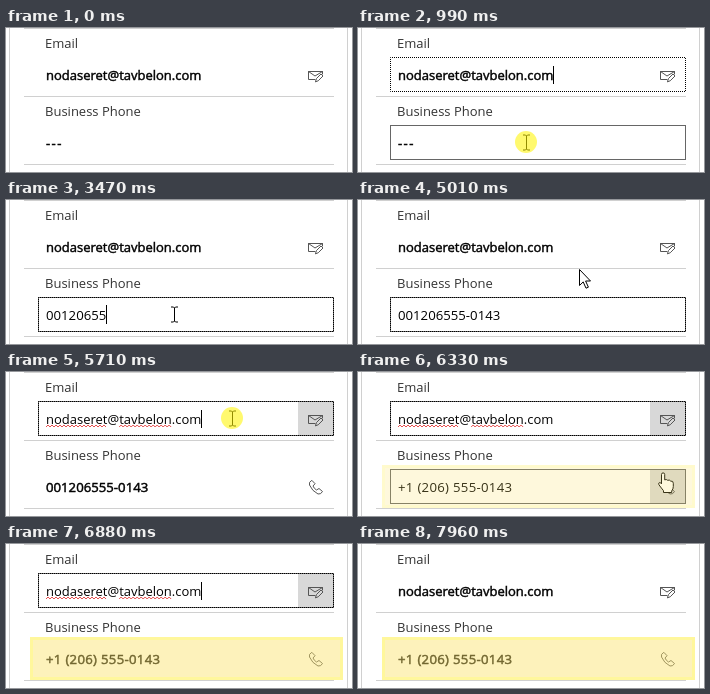
Recreate the animation shown at these times as an HTML page. Size 346 px wide and 144 px high, loop 8510 ms.

```html
<!DOCTYPE html>
<html lang="en">
<head>
<meta charset="utf-8">
<title>Contact form</title>
<style>
html, body { margin: 0; width: 100%; height: 100%; overflow: hidden; background: #fff; }
svg { display: block; }
text { font: 13px "Open Sans", "Noto Sans", sans-serif; fill: #000; }
.label { fill: #333; }
.bold { stroke: #000; stroke-width: .45px; }
.hint { fill: #666; }
.digits { font-size: 13.2px; }
.spaced { letter-spacing: .29px; }
.dashes { letter-spacing: 1.4px; }
.lines { stroke: #d0d0d0; fill: none; }
.box { fill: none; stroke: #666; }
.dots { fill: none; stroke: #000; stroke-dasharray: 1 1; stroke-dashoffset: .5; }
.cell { fill: #d8d8d8; }
.icon { fill: none; stroke: #555; stroke-linejoin: round; stroke-linecap: round; }
.squiggle { fill: none; stroke: #e23b3b; stroke-width: .9; }
.caret { shape-rendering: crispEdges; }
</style>
</head>
<body>
<svg width="346" height="144" viewBox="0 0 346 144">
  <path class="lines" d="M3.5 0V144M341.5 0V144M18 .5H328M18 68.5H328M18 136.5H328"/>
  <text class="label" x="39" y="20">Email</text>
  <text class="label" x="39" y="88">Business Phone</text>

  <g id="email">
    <rect class="cell" x="292" y="30" width="35" height="33"/>
    <rect class="box" x="32.5" y="29.5" width="295" height="34"/>
    <rect class="dots" x="32.5" y="29.5" width="295" height="34"/>
    <text class="value" x="40" y="52">nodaseret@tavbelon.com</text>
    <path class="squiggle"/>
    <rect class="caret" y="38" width="1" height="18"/>
    <path class="icon" d="M309 51.5H302.5V43.5H316.5V46M302.5 43.5L309 48L316.5 43.5M309.5 53.5L310.5 50.5L315 46L317 48L312.5 52.5Z"/>
  </g>

  <g id="phone">
    <rect class="cell" x="292" y="98" width="35" height="33"/>
    <rect class="box" x="32.5" y="97.5" width="295" height="34"/>
    <rect class="dots" x="32.5" y="97.5" width="295" height="34"/>
    <text class="value" x="40" y="120"></text>
    <rect class="caret" y="105" width="1" height="19"/>
    <path class="icon" d="M305.5 108.5Q302.5 110 303.5 113Q306 119 312 122Q315 122.5 316.5 119.5L313 116.5L310.5 118Q308 116.5 307 114L308.8 112Z"/>
  </g>

  <g id="cursor">
    <path id="beam" fill="none" stroke="#000" d="M-3.5-7.5H-1L0-6.5L1-7.5H3.5M0-6.5V6.5M-3.5 7.5H-1L0 6.5L1 7.5H3.5"/>
    <path id="arrow" fill="#fff" stroke="#000" d="M0 0V16L3.7 12.4L6.5 18.7L8.9 17.7L6.1 11.5H11Z"/>
    <path id="hand" fill="#fff" stroke="#000" d="M0 2a1.6 1.6 0 0 1 3.2 0V7.4q1.6-1 3 .4 1.8-.8 3 .8 2.6-.4 2.6 2.2v3.2q0 2.6-1.6 4.4V20H2V18.2Q.2 16-2.6 12.2q-.8-2 .9-2.2Q-.8 10 0 11.4Z"/>
  </g>
  <circle id="click" r="11" fill="#fff500" fill-opacity=".57"/>
  <g id="mark">
    <rect x="27" y="96" width="307" height="37" fill="#fbe268" fill-opacity=".45"/>
    <rect x="25.5" y="94.5" width="310" height="40" fill="none" stroke="#fff79c" stroke-width="3"/>
  </g>
</svg>
<script>
const LOOP = 8510, STEP = 77;
const TYPED = "001206555-0143", FORMATTED = "+1 (206) 555-0143";
const keys = [2690, 2840, 2920, 3000, 3150, 3220, 3390, 3470, 3620, 3700, 3850, 3930, 4080, 4160];
// time, x, y of the pointer
const path = [
  [370, 162, 139], [680, 168, 114], [4480, 168, 114], [5010, 221, 69], [5250, 226, 47],
  [5410, 226, 46], [5790, 226, 46], [6480, 324, 115], [6570, 324, 118], [6880, 322, 150]
];

const $ = id => document.getElementById(id);
const show = (el, on) => el.setAttribute("visibility", on ? "visible" : "hidden");
const within = (t, ...spans) => spans.some(([a, b]) => t >= a && t < b);

function parts(id) {
  const names = ["cell", "box", "dots", "value", "caret", "icon", "squiggle"];
  return Object.fromEntries(names.map(n => [n, $(id).querySelector("." + n)]));
}
const email = parts("email"), phone = parts("phone");

function pointer(t) {
  if (t < path[0][0] || t >= path[path.length - 1][0]) return null;
  const i = path.findIndex(p => p[0] > t) - 1;
  const [t0, x0, y0] = path[i], [t1, x1, y1] = path[i + 1];
  const k = Math.floor((t - t0) / STEP) * STEP / (t1 - t0);
  return { x: Math.round(x0 + (x1 - x0) * k), y: Math.round(y0 + (y1 - y0) * k) };
}

function drawField(f, s) {
  show(f.cell, s.cell);
  show(f.box, s.border);
  show(f.dots, s.focus);
  if (s.text !== undefined && f.value.textContent !== s.text) f.value.textContent = s.text;
  f.value.setAttribute("class", "value " + s.style);
  show(f.icon, s.icon);
  show(f.caret, s.caret);
  if (s.caret) {
    const w = s.atStart ? 0 : f.value.getComputedTextLength();
    f.caret.setAttribute("x", Math.round(40 + w));
  }
}

function wave(from, to) {
  let d = `M${from} 55`;
  for (let x = from + 2, up = true; x <= to; x += 2, up = !up) d += `L${x} ${up ? 53 : 55}`;
  return d;
}

function drawEmail(t, over) {
  const edit = within(t, [5710, 7960]), early = within(t, [910, 1060]);
  drawField(email, {
    border: over || edit, focus: edit || early, cell: over || edit, icon: true,
    style: edit ? "" : "bold",
    caret: early || within(t, [5710, 6180], [6650, 7260], [7730, 7960])
  });
  show(email.squiggle, edit);
  if (edit && !email.squiggle.hasAttribute("d")) {
    const len = n => 40 + email.value.getSubStringLength(0, n);
    email.squiggle.setAttribute("d", wave(40, len(9)) + wave(len(10), len(18)));
  }
}

function phoneText(t, over) {
  if (t < 1060) return ["---", "bold dashes"];
  if (t < keys[0]) return ["Provide a telephone number", "hint"];
  const weight = t < 5710 || over ? "" : " bold";
  if (t >= 6100) return [FORMATTED, "digits spaced" + weight];
  return [TYPED.slice(0, keys.filter(k => k <= t).length), "digits" + weight];
}

function drawPhone(t, over) {
  const [text, style] = phoneText(t, over);
  const focus = within(t, [1060, 5710]);
  drawField(phone, {
    text, style, focus, border: over || focus,
    cell: over && t > 5710, icon: t >= 5710, atStart: t < keys[0],
    caret: within(t, [1060, 1600], [2060, 2610], [2690, 4710], [5170, 5710])
  });
}

function drawPointer(p, t) {
  const inEmail = p && p.y >= 29 && p.y < 64, inPhone = p && p.y >= 97 && p.y < 132;
  const inside = inEmail || inPhone, hand = inside && p.x >= 292;
  show($("beam"), inside && !hand);
  show($("arrow"), p && !inside);
  show($("hand"), hand);
  show($("click"), within(t, [830, 1060], [5640, 5790]));
  if (p) {
    $("cursor").setAttribute("transform", `translate(${p.x + .5} ${p.y + .5})`);
    $("click").setAttribute("cx", p.x);
    $("click").setAttribute("cy", p.y);
  }
  return [inEmail, inPhone];
}

function render(t) {
  const [overEmail, overPhone] = drawPointer(pointer(t), t);
  drawEmail(t, overEmail);
  drawPhone(t, overPhone);
  const fade = Math.floor((t - 6180) / 75) / 4;
  $("mark").style.opacity = Math.max(0, Math.min(1, fade));
}

const start = performance.now();
function tick() {
  render((performance.now() - start) % LOOP);
  requestAnimationFrame(tick);
}
tick();
</script>
</body>
</html>
```
